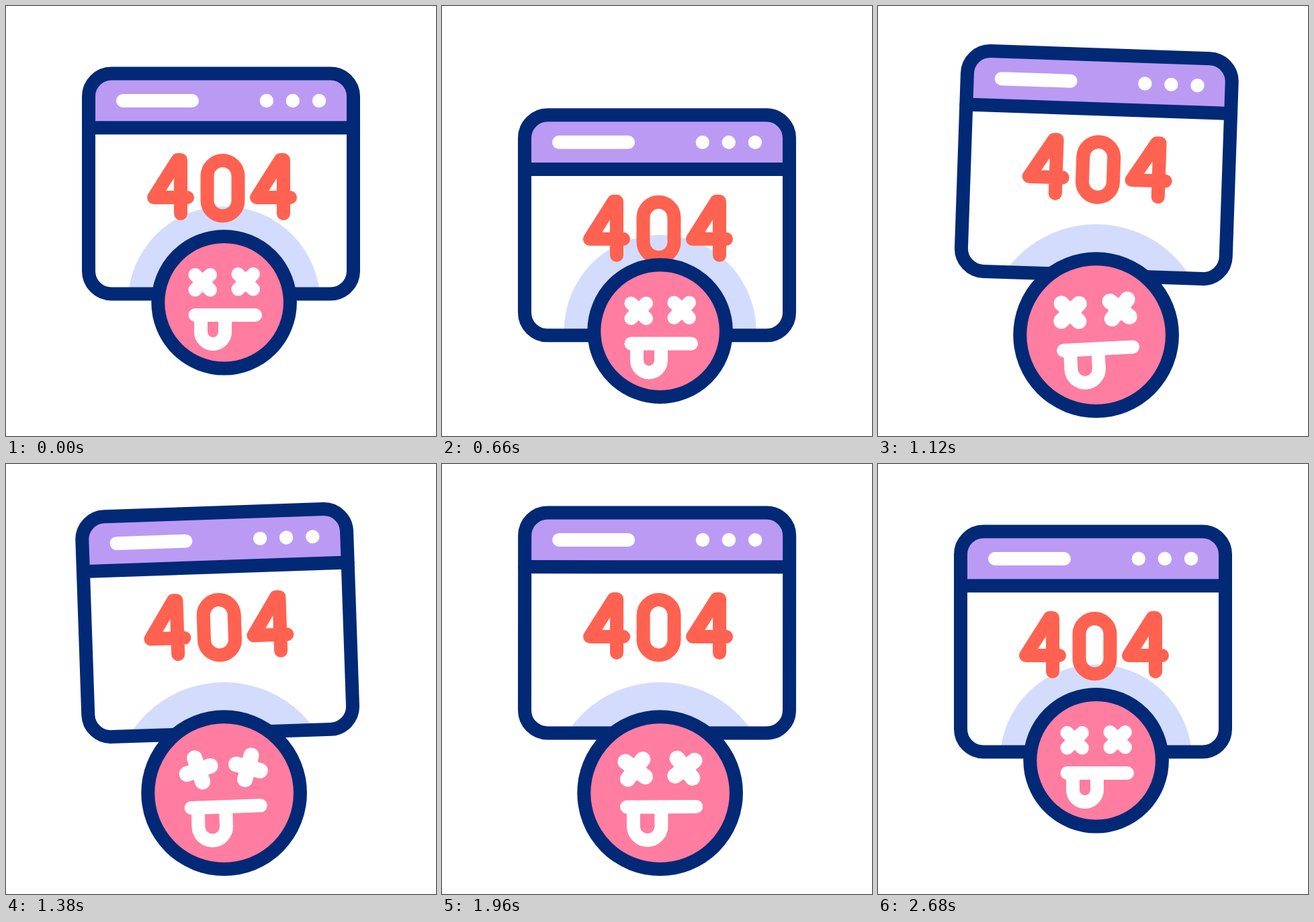
Animation of 640 by 640 pixels, one loop 2.84 s. Source, as an HTML page without scripts:

```html
<!DOCTYPE html>
<html lang="en">
<head>
<meta charset="utf-8">
<title>404</title>
<style>
  html, body { margin: 0; width: 100%; height: 100%; overflow: hidden; background: #fff; }
  svg { display: block; width: 100%; height: 100%; }

  .line { fill: none; stroke-width: 20; stroke-linecap: round; stroke-linejoin: round; }
  .line, .line * { vector-effect: non-scaling-stroke; }
  .navy { stroke: #022976; }
  .red { stroke: #ff6250; }
  .white { stroke: #fff; }

  .window, .head, .face, .eye { animation: 2840ms ease-in-out infinite; }
  .window {
    transform-origin: 320px 419.5px;
    animation-name: window-move, window-swing;
    animation-timing-function: ease-in-out, cubic-bezier(.37, 0, .63, 1);
  }
  .head, .face { transform-origin: 324.6px 441.2px; }
  .head { animation-name: head-move, head-grow; }
  .face { animation-name: face-tilt; }
  .eye { animation-name: spin; animation-timing-function: linear; }
  .eye.right { animation-name: spin-back; }

  @keyframes window-move {
    0%, .5% { translate: 0 0; }
    11.97%, 19.01% { translate: 0 100px; }
    30.28%, 80.28% { translate: 0 -28px; animation-timing-function: ease-in; }
    85.92%, 100% { translate: 0 0; }
  }
  @keyframes window-swing {
    0%, 23.24%, 78.17%, 83.1%, 94.37%, 100% { rotate: 0deg; }
    27.82%, 46.13%, 64.44% { rotate: -3deg; }
    36.97%, 55.28%, 73.59% { rotate: 3deg; }
    86.62% { rotate: 15deg; }
    90.85% { rotate: -15deg; }
  }
  @keyframes head-move {
    0%, .5% { translate: 0 0; }
    11.97%, 13.38% { translate: 0 -41px; animation-timing-function: cubic-bezier(.33, .67, .67, 1); }
    26.76%, 76.06% { translate: 0 48.5px; animation-timing-function: ease-in-out; }
    86.62%, 100% { translate: 0 0; }
  }
  @keyframes head-grow {
    0%, 23.94% { scale: 1; }
    32.39%, 76.76% { scale: 1.153; }
    87.32%, 100% { scale: 1; }
  }
  @keyframes face-tilt {
    0%, 26.76% { rotate: 0deg; translate: 0 0; }
    39.44% { rotate: -3deg; translate: 0 -1px; }
    57.75% { rotate: -1deg; translate: 0 -1px; }
    76.06% { rotate: 0deg; translate: 0 -1px; }
    87.32%, 100% { rotate: 0deg; translate: 0 0; }
  }
  @keyframes spin {
    0%, 38.03% { rotate: 0deg; }
    71.83%, 100% { rotate: 90deg; }
  }
  @keyframes spin-back {
    0%, 38.03% { rotate: 0deg; }
    71.83%, 100% { rotate: -90deg; }
  }
</style>
</head>
<body>
<svg viewBox="0 0 640 640" role="img" aria-label="404">
  <defs>
    <clipPath id="inside">
      <rect class="window" x="123" y="100.5" width="394" height="328" rx="34"/>
    </clipPath>
    <path id="four" d="M270 285H220L255.5 229H260V309"/>
    <path id="cross" d="M-11.3-11.3 11.3 11.3M11.3-11.3-11.3 11.3"/>
  </defs>

  <g clip-path="url(#inside)">
    <circle class="head" cx="324.6" cy="441.2" r="143" fill="#d3dcfd"/>
  </g>

  <g class="window">
    <path d="M123 181V134.5a34 34 0 0 1 34-34H483a34 34 0 0 1 34 34V181z" fill="#bb9af4"/>
    <g class="line red">
      <use href="#four"/>
      <rect x="299.5" y="230" width="46" height="82.5" rx="23"/>
      <use href="#four" x="153"/>
    </g>
    <g class="line navy">
      <rect x="123" y="100.5" width="394" height="328" rx="34"/>
      <path d="M123 181.2H517"/>
    </g>
    <path class="line white" d="M174 141H277"/>
    <g fill="#fff">
      <circle cx="387.8" cy="141" r="10.2"/>
      <circle cx="426.8" cy="141" r="10.2"/>
      <circle cx="466" cy="141" r="10.2"/>
    </g>
  </g>

  <g class="head">
    <circle class="line navy" cx="324.6" cy="441.2" r="98.3" style="fill:#fe7da0"/>
    <g class="face line white">
      <g transform="translate(292.7 411.3)"><use class="eye" href="#cross"/></g>
      <g transform="translate(356.7 410.3)"><use class="eye right" href="#cross"/></g>
      <path d="M281.5 460H371M290 460V485a18 18 0 0 0 36 0V460"/>
    </g>
  </g>
</svg>
</body>
</html>
```
